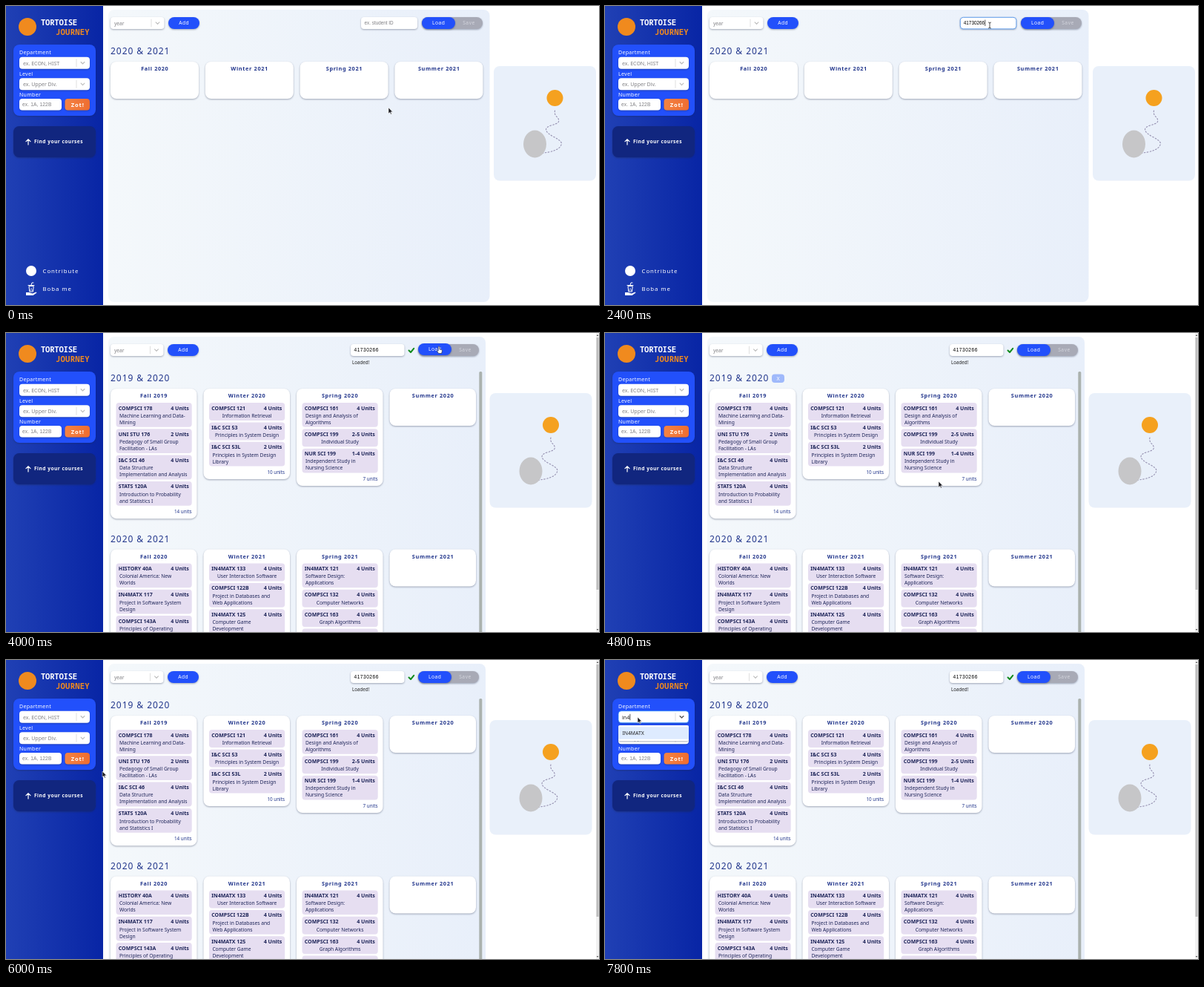
Recreate the animation shown at these times as an HTML page. Size 800 by 403 pixels, loop 8 s.

```html
<!DOCTYPE html>
<html lang="en">
<head>
<meta charset="utf-8">
<title>Course planner</title>
<style>
  html, body { margin: 0; width: 100%; height: 100%; overflow: hidden; background: #fff; }
  svg { display: block; width: 100vw; height: 100vh; }
  text { font-family: "Noto Sans", "Open Sans", sans-serif; white-space: pre; }
  .arial { font-family: "Liberation Sans", Arial, sans-serif; }
  .mono { font-family: "Noto Sans Mono", monospace; }
  .b { font-weight: 700; }
  .s { font-weight: 600; }
  .m { font-weight: 500; }
  .mid { text-anchor: middle; }
  .end { text-anchor: end; }
  .lift { filter: drop-shadow(0 1.5px 1.2px rgba(30, 40, 70, .38)); }
  .line { fill: none; stroke-linecap: round; stroke-linejoin: round; }
</style>
</head>
<body>
<svg id="stage" viewBox="0 0 800 403" preserveAspectRatio="none"></svg>
<script>
const NAVY = '#22368c', INK = '#1d2458', BLUE = '#2250fb', GREY = '#808084', WHITE = '#fff', ORANGE = '#f08a1e';
const STUDENT = '41730266';
const LOOP = 8000, TICK = 100;

// ---------- drawing helpers ----------
const txt = (x, cy, s, size, fill, cls = '', gap = 0) =>
  `<text x="${x}" y="${cy + size * .36}" font-size="${size}" fill="${fill}" class="${cls}" letter-spacing="${gap}">${s.replace(/&/g, '&amp;')}</text>`;
const box = (x, y, w, h, r, fill, more = '') =>
  `<rect x="${x}" y="${y}" width="${w}" height="${h}" rx="${r}" fill="${fill}" ${more}/>`;
const stroke = (d, color, w = 1, more = '') =>
  `<path class="line" d="${d}" stroke="${color}" stroke-width="${w}" ${more}/>`;
const dot = (x, y, r, fill) => `<circle cx="${x}" cy="${y}" r="${r}" fill="${fill}"/>`;
const group = (id, body, cls = '') => `<g id="${id}" class="${cls}">${body}</g>`;
const chevron = (x, y, color) => stroke(`M${x - 2.4} ${y - 1.2}l2.4 2.5 2.4-2.5`, color, 1.1);

function select(x, y, w, split, hint, size = 7) {
  return box(x, y, w, 16, 4, WHITE, 'class="lift"')
    + stroke(`M${split} ${y + 3}v10`, '#ccc', .6)
    + chevron(split + 8.5, y + 8, '#bbb')
    + hint(x + 5, y + 8.3, size);
}
const hint = s => (x, y, size) => txt(x, y, s, size, GREY);

// ---------- sidebar ----------
const sidebar =
  box(0, 0, 131, 403, 0, 'url(#side)')
  + dot(29, 28, 12, ORANGE)
  + txt(47, 21.700, 'TORTOISE', 10.6, WHITE, 'mono s', -.25)
  + txt(67, 34.700, 'JOURNEY', 10.6, ORANGE, 'mono s', .2)
  + box(10, 52, 111, 96, 8, BLUE, 'class="lift"')
  + txt(18, 62, 'Department', 7, WHITE, '', .3)
  + txt(18, 91, 'Level', 7, WHITE, '', .3)
  + txt(18, 119.7, 'Number', 7, WHITE, '', .3)
  + select(18, 68.7, 95, 95, () => '')
  + select(18, 97.3, 95, 95, hint('ex. Upper Div.'))
  + box(18, 125, 57, 15.5, 4, WHITE, 'class="lift"')
  + txt(22, 132.7, 'ex. 1A, 122B', 6.7, GREY, 'arial', .1)
  + box(79.5, 125, 33.5, 15.5, 4, 'url(#zot)', 'class="lift"')
  + txt(96.8, 132.8, 'Zot!', 7.6, WHITE, 'b mid', .9)
  + box(10, 162, 111, 42, 8, '#11267f', 'class="lift"')
  + stroke('M30 187v-7.2M27 182.600l3-3 3 3', WHITE, 1.2)
  + txt(38, 183, 'Find your courses', 6.6, WHITE, 'b', .47);

const links =
  dot(34, 357, 7, WHITE)
  + txt(49.5, 357.3, 'Contribute', 7.8, WHITE, '', .95)
  + stroke('M30 376.500h8M31 378l.8 7h4.600l.8-7zM34 376l1-3h2', WHITE, 1)
  + dot(33, 383, .7, WHITE) + dot(35.2, 383, .7, WHITE) + dot(34.1, 381, .7, WHITE)
  + '<path d="M27 386h4l3 1 2 .6 4.500-2 1 .8-5 3.600H27z" fill="#fff"/>'
  + txt(49.5, 381, 'Boba me', 7.8, WHITE, '', .95);

// ---------- planner ----------
const scene = x => box(x, 81, 138, 154.500, 8, '#e9f0fa')
  + `<g transform="translate(${x - 658.5} 0)">`
  + dot(741, 124, 11, '#f5a11f')
  + stroke('M741 141C739 149 748 150 746 156C743 161 729 160 729 167C731 175 748 178 750 185C749 194 736 197 722 198.500', '#9590b0', 1.1, 'stroke-dasharray="1.6 2.4"')
  + '<ellipse cx="714" cy="186" rx="15.5" ry="18.5" fill="#c6c6c8"/></g>';

function toolbar(o) {
  return select(141, 15, o.yearW, o.split, hint('year'), 6.6)
    + box(o.add, 15, 42, 16, 8, BLUE, 'class="lift"')
    + txt(o.add + 21.2, 23, 'Add', 6.7, WHITE, 'mid', .45)
    + box(o.id, 15, o.idW, 16, 4, WHITE, 'class="lift"')
    + box(o.load, 15, 82, 16, 8, '#a8aab6', 'class="lift"')
    + txt(o.load + 63.5, 23, 'Save', 6.7, '#d3d5dd', 'mid', .5)
    + group(o.key + 'Load', box(o.load, 15, 45, 16, 8, BLUE) + txt(o.load + 22.6, 23, 'Load', 6.7, WHITE, 'mid', .5), 'lift');
}

const years = (y, s) => txt(141, y, s, 12, NAVY, 'm', .95);
const closer = (id, y) => group(id, box(225, y - 5.5, 17, 11.500, 4, '#9fb9fb') + txt(233.5, y + .2, 'X', 7.2, WHITE, 'mid'));

function card(x, y, w, title, rows = [], total = '', open = false) {
  let out = '', top = y + 19;
  for (const [code, units, ...lines] of rows) {
    const two = lines.length > 1, rx = x + 7.5, rw = w - 14.3;
    out += box(rx, top, rw, two ? 32.8 : 24, 4, '#e6def1')
      + txt(rx + 3.3, top + 7, code, 7, INK, 'b')
      + txt(rx + rw - 3.8, top + 7, units + ' Units', 7.1, INK, 'b end');
    lines.forEach((s, i) => {
      out += two ? txt(rx + 4.4, top + 17.3 + i * 9, s, 6.7, INK)
        : txt(rx + rw / 2, top + 17.5, s, 6.7, INK, 'mid');
    });
    top += two ? 35.3 : 26.4;
  }
  const h = open ? 150 : rows.length ? top - y + 15 : 50;
  if (total) out += txt(x + w - 7, top + 6, total + ' units', 6.3, NAVY, 'end');
  return box(x, y, w, h, 8, WHITE, 'class="lift"')
    + txt(x + w / 2 + .3, y + 9.7, title, 7.3, NAVY, 's mid', .65) + out;
}

const terms = (first) => ['Fall ' + first, 'Winter ' + (first + 1), 'Spring ' + (first + 1), 'Summer ' + (first + 1)];

const before = links
  + box(138, 5, 514.5, 394, 8, 'url(#main)')
  + toolbar({ key: 'a', yearW: 72.5, split: 196, add: 219, id: 479, idW: 76, load: 561 })
  + years(60.7, '2020 & 2021') + closer('aX', 61)
  + terms(2020).map((s, i) => card(141 + i * 127.8, 75, 119, s)).join('')
  + scene(658);

const plan = [
  [[
    ['COMPSCI 178', '4', 'Machine Learning and Data-', 'Mining'],
    ['UNI STU 176', '2', 'Pedagogy of Small Group', 'Facilitation - LAs'],
    ['I&C SCI 46', '4', 'Data Structure', 'Implementation and Analysis'],
    ['STATS 120A', '4', 'Introduction to Probability', 'and Statistics I']], '14'],
  [[
    ['COMPSCI 121', '4', 'Information Retrieval'],
    ['I&C SCI 53', '4', 'Principles in System Design'],
    ['I&C SCI 53L', '2', 'Principles in System Design', 'Library']], '10'],
  [[
    ['COMPSCI 161', '4', 'Design and Analysis of', 'Algorithms'],
    ['COMPSCI 199', '2-5', 'Individual Study'],
    ['NUR SCI 199', '1-4', 'Independent Study in', 'Nursing Science']], '7'],
  [[], '']
];
const nextPlan = [
  [
    ['HISTORY 40A', '4', 'Colonial America: New', 'Worlds'],
    ['IN4MATX 117', '4', 'Project in Software System', 'Design'],
    ['COMPSCI 143A', '4', 'Principles of Operating', 'Systems']],
  [
    ['IN4MATX 133', '4', 'User Interaction Software'],
    ['COMPSCI 122B', '4', 'Project in Databases and', 'Web Applications'],
    ['IN4MATX 125', '4', 'Computer Game', 'Development']],
  [
    ['IN4MATX 121', '4', 'Software Design:', 'Applications'],
    ['COMPSCI 132', '4', 'Computer Networks'],
    ['COMPSCI 163', '4', 'Graph Algorithms'],
    ['IN4MATX 131', '4', 'Human Interfaces']],
  []
];
const colX = i => 141 + i * 125.5;
const after = box(138, 5, 509, 420, 8, 'url(#main)')
  + toolbar({ key: 'b', yearW: 71.5, split: 194.5, add: 218, id: 465, idW: 72.5, load: 556 })
  + txt(469.5, 22.800, STUDENT, 6.6, '#000', 'arial', .5)
  + stroke('M543.500 23.500l2.500 2.500 4.200-5.200', '#118a1c', 2)
  + txt(467, 40, 'Loaded!', 6.2, '#222')
  + years(60.7, '2019 & 2020') + closer('bX1', 61)
  + terms(2019).map((s, i) => card(colX(i), 75, 116.5, s, ...plan[i])).join('')
  + years(277.3, '2020 & 2021') + closer('bX2', 277.6)
  + terms(2020).map((s, i) => card(colX(i), 291.5, 116.5, s, nextPlan[i], '', nextPlan[i].length > 0)).join('')
  + box(638.3, 52, 4, 360, 1.5, '#abb2ae')
  + scene(652.5)
  + box(796, 0, 4, 403, 0, '#f1f1f1') + box(796.5, 6, 3, 340, 0, '#bdbdbd')
  + '<path d="M796.700 4l1.300-2 1.300 2zM796.700 399l1.300 2 1.300-2z" fill="#555"/>';

// ---------- inputs and menus ----------
const idField = box(479.3, 15.3, 75.6, 15.6, 4, 'none', 'stroke="#5d9bea" stroke-width="1"');
const deptFocus = box(18, 68.7, 95, 16, 4, 'none', 'stroke="#2684ff" stroke-width=".8"') + chevron(103.5, 76.7, '#555');

function menu(id, items, h, scroll = '') {
  const list = items.map((s, i) => txt(23.5, 98.6 + i * 16.42, s, 6.8, '#222')).join('');
  return group(id, `<g class="lift">${box(18, 88, 95, h, 2, WHITE)}</g><g clip-path="url(#menuClip)">`
    + box(18, 90.3, 95, 16.4, 0, '#deebff') + list + scroll + '</g>');
}
const bar = box(106, 88, 7, 141.5, 0, '#f1f1f1') + box(106.8, 95, 5.4, 14.5, 0, '#c1c1c1')
  + '<path d="M107.800 93l1.700-2 1.700 2zM107.800 225l1.700 2 1.700-2z" fill="#555"/>';
const caret = (id, x, y) => group(id, stroke(`M${x} ${y - 3.8}v7.600`, '#111', .7));

const pointers = group('pointer',
  group('arrow', '<path d="M0 0V8L1.900 6.300 3.100 9 4.300 8.500 3.100 5.800H5.600Z" fill="#1c1c22" stroke="#fff" stroke-width=".5"/>')
  + group('beam', stroke('M-1.500 -4q1.500 0 1.500 1V3q0 1 1.500 1M1.500 -4q-1.500 0-1.500 1M0 3q0 1-1.500 1', '#222', .8))
  + group('hand', '<path d="M-.9 -2.500q.9-1.300 1.800 0V1l2.600.6q1.100.4.9 1.600L3.600 6.500H-.4L-2.600 3.200q.2-1.100 1.700 0Z" fill="#fff" stroke="#1c1c22" stroke-width=".6"/>'));

const stage = document.getElementById('stage');
stage.innerHTML = `<defs>
  <linearGradient id="side"><stop stop-color="#2040b4"/><stop offset="1" stop-color="#0825a5"/></linearGradient>
  <linearGradient id="main"><stop stop-color="#f4f8fb"/><stop offset="1" stop-color="#e8effa"/></linearGradient>
  <linearGradient id="zot"><stop stop-color="#f58343"/><stop offset="1" stop-color="#ee6d30"/></linearGradient>
  <clipPath id="menuClip"><rect x="18" y="88" width="95" height="141.500"/></clipPath></defs>`
  + sidebar + group('before', before) + group('after', after)
  + group('idHint', txt(483.5, 22.8, 'ex. student ID', 6.35, GREY, 'arial'))
  + group('idText', txt(483.8, 22.8, STUDENT, 6.35, '#000', 'arial'))
  + group('idFocus', idField) + caret('caretStart', 484.3, 22.8) + caret('caretEnd', 512.8, 22.8)
  + group('deptHint', txt(23, 77.2, 'ex. ECON, HIST', 7, GREY))
  + group('deptFocus', deptFocus) + caret('deptCaret', 22.8, 77)
  + group('typed2', txt(23, 77.2, 'in', 7, '#222')) + caret('caret2', 30, 77)
  + group('typed3', txt(23, 77.2, 'in4', 7, '#222')) + caret('caret3', 33.8, 77)
  + menu('menuAll', ['AC ENG', 'AFAM', 'ANATOMY', 'ANTHRO', 'ARABIC', 'ARMN', 'ART', 'ART HIS', 'ARTS'], 141.5, bar)
  + menu('menuSome', ['CHINESE', 'ENGIN', 'FIN', 'IN4MATX', 'INTL ST', 'LINGUIS', 'TRAIN'], 119.5)
  + menu('menuOne', ['IN4MATX'], 21)
  + pointers;

// ---------- timeline ----------
const at = id => document.getElementById(id);
const show = (id, on) => { at(id).style.display = on ? '' : 'none'; };

// time, x, y
const track = [
  [0, 516, 137], [100, 517, 134], [500, 530, 90], [900, 546, 36], [1200, 506, 27], [2300, 506, 27],
  [2900, 584, 21], [4500, 584, 21], [4800, 450, 200], [4950, 300, 330], [5100, 190, 260],
  [5250, 320, 160], [5400, 467.5, 133], [5700, 330, 210], [6000, 130, 150], [6200, 44, 77], [LOOP, 44, 77]
];
function pointerAt(t) {
  const i = Math.max(1, track.findIndex(k => k[0] >= t));
  const [t0, x0, y0] = track[i - 1], [t1, x1, y1] = track[i];
  const p = (t - t0) / (t1 - t0);
  return [x0 + (x1 - x0) * p, y0 + (y1 - y0) * p];
}

function render(ms) {
  const t = Math.floor(ms % LOOP / TICK) * TICK;
  const during = (a, b) => t >= a && t < b;
  const [x, y] = pointerAt(t);
  const inside = (x0, y0, x1, y1) => x >= x0 && x < x1 && y >= y0 && y < y1;
  const loaded = t >= 3700;

  show('before', !loaded);
  show('after', loaded);
  show('idHint', t < 2100);
  show('idText', during(2100, 3700));
  show('idFocus', during(1100, 3500));
  show('caretStart', during(1100, 1700));
  show('caretEnd', during(2100, 2700) || during(3300, 3500));

  show('deptHint', t < 7500);
  show('deptFocus', t >= 6300);
  show('deptCaret', during(6300, 6800));
  for (const id of ['typed2', 'caret2', 'menuSome']) show(id, during(7500, 7700));
  for (const id of ['typed3', 'caret3', 'menuOne']) show(id, t >= 7700);
  show('menuAll', during(6300, 7500));

  const onLoad = loaded ? inside(556, 14, 601, 31) : inside(561, 14, 606, 31);
  const onField = !loaded && inside(479, 15, 555, 31);
  for (const key of ['aLoad', 'bLoad']) at(key).setAttribute('transform', `translate(0 ${onLoad ? -1 : 0})`);
  show('aX', inside(138, 50, 652, 130));
  show('bX1', inside(138, 50, 638, 260));
  show('bX2', inside(138, 266, 638, 403));

  show('hand', onLoad);
  show('beam', onField);
  show('arrow', !onLoad && !onField);
  at('pointer').setAttribute('transform', `translate(${x} ${y})`);
}

const start = performance.now();
function loop() {
  render(performance.now() - start);
  requestAnimationFrame(loop);
}
loop();
</script>
</body>
</html>
```
